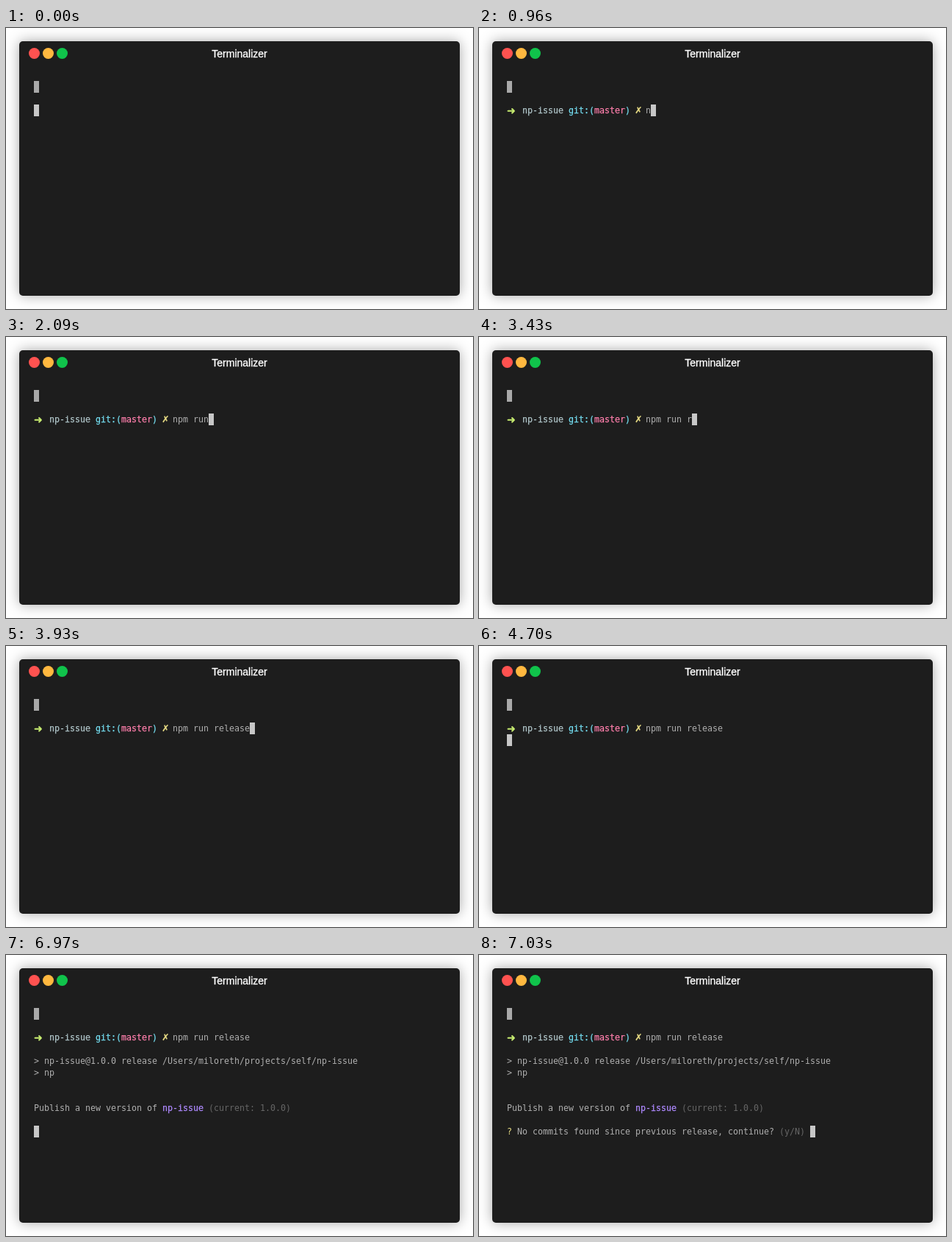
An HTML page that plays this animation: 636x382 px, repeating every 8 s.

```html
<!DOCTYPE html>
<html lang="en">
<head>
<meta charset="utf-8">
<title>Terminal session</title>
<style>
html, body { margin: 0; width: 100%; height: 100%; overflow: hidden; background: #fff; }
#window {
  position: absolute; left: 18px; top: 18px; width: 600px; height: 346px;
  border-radius: 5px; background: #1d1d1d; box-shadow: 0 0 18px rgba(0, 0, 0, .35);
}
#title {
  font: 14px/34px "Liberation Sans", Arial, sans-serif; text-align: center;
  color: #fff; -webkit-text-stroke: .3px;
}
.light { position: absolute; top: 9px; width: 15px; height: 15px; border-radius: 50%; }
#screen {
  position: absolute; left: 20px; top: 54px; color: #afafaf;
  font: 11.63px/16px "DejaVu Sans Mono", monospace;
}
#screen span { position: absolute; height: 16px; white-space: pre; }
#screen .block { width: 7px; }
.bold { -webkit-text-stroke: .25px; }
.sign { font-family: "DejaVu Sans", sans-serif; font-size: 12px; }
.arrow { font-size: 14px; -webkit-text-stroke: .4px; }
</style>
</head>
<body>
<div id="window">
  <i class="light" style="left:13px;background:#ff5250"></i>
  <i class="light" style="left:32px;background:#ffb83f"></i>
  <i class="light" style="left:51px;background:#10c34b"></i>
  <div id="title">Terminalizer</div>
  <div id="screen"></div>
</div>
<script>
const LOOP = 8000, CELL = 7, LINE = 16;
const COMMAND = "npm run release", COMMAND_COL = 27;
const FG = "#afafaf", DIM = "#666", YELLOW = "#ebdf86";
const screen = document.getElementById("screen");

function place(el, row, col) {
  el.style.left = col * CELL + "px";
  el.style.top = row * LINE + "px";
}

function add(row, col, text, color, className = "") {
  const el = document.createElement("span");
  el.textContent = text;
  el.className = className;
  el.style.color = color;
  place(el, row, col);
  return screen.appendChild(el);
}

function addBlock(row, color) {
  const el = add(row, 0, "", FG, "block");
  el.style.background = color;
  return el;
}

// start time, row, column, text, colour, class
const parts = [
  [30, 2, 0, "➜", "#c8ed71", "sign arrow"],
  [30, 2, 3, "np-issue", "#b1c6ca", "bold"],
  [30, 2, 12, "git:(", "#75dff2", "bold"],
  [30, 2, 17, "master", "#ff7fac", "bold"],
  [30, 2, 23, ")", "#75dff2", "bold"],
  [30, 2, 24.9, "✗", YELLOW, "sign bold"],
  [4970, 4, 0, "> np-issue@1.0.0 release /Users/miloreth/projects/self/np-issue", FG],
  [4970, 5, 0, "> np", FG],
  [6970, 8, 0, "Publish a new version of", FG],
  [6970, 8, 25, "np-issue", "#ae89fe", "bold"],
  [6970, 8, 34, "(current: 1.0.0)", DIM],
  [7030, 10, 0, "?", YELLOW],
  [7030, 10, 2, "No commits found since previous release, continue?", FG],
  [7030, 10, 53, "(y/N)", DIM]
].map(([start, ...args]) => ({ start, el: add(...args) }));

// time and number of command characters typed
const typing = [
  [30, 0], [960, 1], [1020, 2], [1090, 3], [1360, 4], [1910, 5], [2000, 6],
  [2090, 7], [2860, 8], [3430, 9], [3510, 10], [3760, 11], [3930, 15]
];

// time, row and column of the cursor
const moves = [
  [0, 2, 0],
  ...typing.map(([t, n]) => [t, 2, COMMAND_COL + n]),
  [4700, 3, 0], [4970, 7, 0], [6970, 10, 0], [7030, 10, 59]
];

const latest = (list, t) => list.findLast(([start]) => start <= t);

addBlock(0, "#a9a9a9");
const command = add(2, COMMAND_COL, "", FG);
const cursor = addBlock(2, "#c7c7c7");

function draw(now) {
  const t = now % LOOP;
  for (const { start, el } of parts) el.style.visibility = t < start ? "hidden" : "visible";
  const typed = latest(typing, t);
  command.textContent = COMMAND.slice(0, typed ? typed[1] : 0);
  const [, row, col] = latest(moves, t);
  place(cursor, row, col);
}

const begin = performance.now();
function tick() {
  draw(performance.now() - begin);
  requestAnimationFrame(tick);
}
tick();
</script>
</body>
</html>
```
